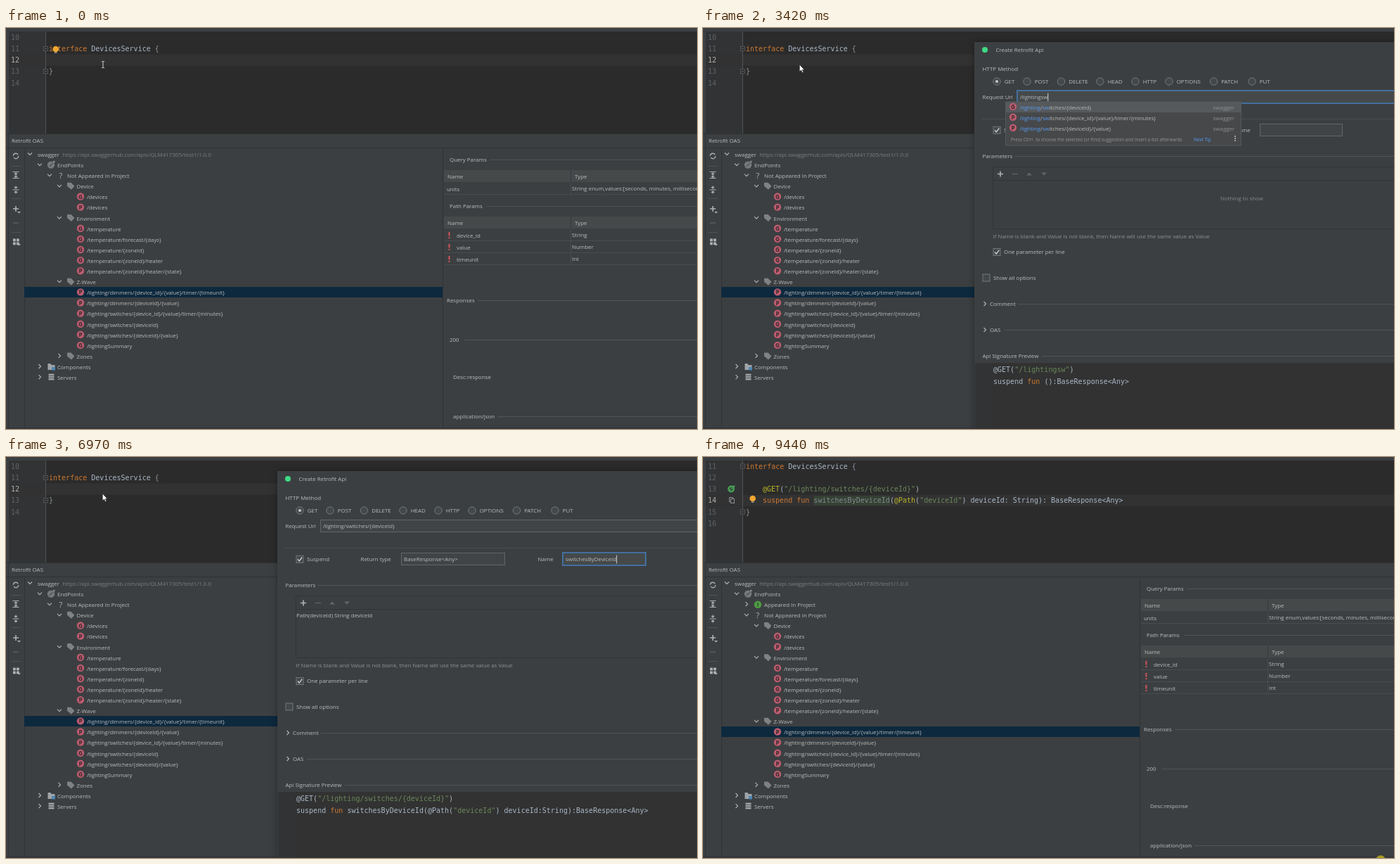
Recreate the animation shown at these times as an HTML page. Size 983x570 px, loop 9.5 s.

```html
<!DOCTYPE html>
<html lang="en">
<head>
<meta charset="utf-8">
<title>API dialog</title>
<style>
html, body { margin: 0; width: 100%; height: 100%; overflow: hidden; background: #3c3f41; }
svg { display: block; width: 983px; height: 570px; }
text { font: 7.95px "Open Sans", "Noto Sans", sans-serif; fill: #bbb; white-space: pre; }
.mono { font: 10.03px "DejaVu Sans Mono", "Noto Sans Mono", monospace; }
.path { font-size: 7.78px; }
.hint { font-size: 6.4px; }
.mark { font-size: 11px; }
.verb { font-size: 8.2px; font-weight: 700; text-anchor: middle; fill: #38292d; }
.frame { filter: drop-shadow(0 0 5px rgba(0, 0, 0, .35)); }
</style>
</head>
<body>
<svg id="stage" viewBox="0 0 983 570"></svg>
<script>
const LOOP = 9500;
const C = {
  panel: '#3c3f41', editor: '#2b2b2b', gutter: '#313335', row: '#323232', rule: '#515456',
  text: '#bbbbbb', dim: '#7c7e80', code: '#a9b7c6', brace: '#8d959e', key: '#cc7832', str: '#6a8759', ann: '#bbb529',
  faded: '#858a8e', pink: '#bc5c70', icon: '#afb1b3', blue: '#589df6', focus: '#436f9f'
};

// Drawing helpers; text y is the visual centre of the line
const esc = s => s.replace(/&/g, '&amp;').replace(/</g, '&lt;');
const rect = (x, y, w, h, fill, more = '') => `<rect x="${x}" y="${y}" width="${w}" height="${h}" fill="${fill}" ${more}/>`;
const box = (x, y, w, h, fill, stroke, sw = 1, more = '') => rect(x, y, w, h, fill, `stroke="${stroke}" stroke-width="${sw}" ${more}`);
const circle = (x, y, r, fill, more = '') => `<circle cx="${x}" cy="${y}" r="${r}" fill="${fill}" ${more}/>`;
const line = (d, stroke = C.icon, sw = 1.2) => `<path d="${d}" fill="none" stroke="${stroke}" stroke-width="${sw}"/>`;
const label = (x, y, s, fill = C.text, more = '') => `<text x="${x}" y="${y + 2.9}" style="fill:${fill}" ${more}>${esc(s)}</text>`;
const spans = parts => parts.map(([fill, s]) => `<tspan style="fill:${fill}">${esc(s)}</tspan>`).join('');
const code = (x, y, parts, more = '') => `<text class="mono" x="${x}" y="${y + 3.6}" ${more}>${spans(parts)}</text>`;
const group = (id, ...body) => `<g id="${id}">${body.join('')}</g>`;
const titled = (x, y, s, from) => label(x, y, s) + line(`M${from} ${Math.floor(y) + .5}H1010`, C.rule, 1);
const chevron = (x, y, open) => line(open ? `M${x - 3} ${y - 2.5}l3 3l3-3` : `M${x - 1.5} ${y - 3}l3 3l-3 3`);

const bulb = (x, y) => circle(x, y, 4.3, '#f0a732') + rect(x - 1.8, y + 4.4, 3.6, 1.5, '#9a9a9a');
const verb = (x, y, letter) => circle(x, y, 5.2, C.pink) + `<text class="verb" x="${x}" y="${y + 3}">${letter}</text>`;
const tag = (x, y) => `<path d="M${x - 5} ${y - 5}h5.5l5 5l-4.5 5l-6-5z" fill="#7f8183"/>`;
const fold = y => box(53.5, y - 3, 6, 6, C.editor, '#606366', .8) + line(`M55 ${y}h3`, '#7a7d80', .8);

const lineY = k => 13 + 16.25 * k;
function editor(first, count, current, open, close) {
  let out = rect(0, 5, 983, 145, C.editor) + rect(4, 5, 52, 145, C.gutter) + rect(0, 5, 4, 145, C.panel) +
    rect(4, lineY(current) - 8, 979, 16.2, C.row) + line('M56.5 5V150', '#55585a', .9);
  for (let k = 0; k < count; k++)
    out += code(7, lineY(k), [[k === current ? '#b0b0b0' : '#606366', String(first + k)]]);
  return out + fold(lineY(open)) + fold(lineY(close)) +
    code(61, lineY(open), [[C.key, 'interface '], [C.code, 'DevicesService '], [C.brace, '{']]) + code(61, lineY(close), [[C.brace, '}']]);
}

const paths = {
  device: ['G/devices', 'P/devices'],
  environment: ['G/temperature', 'G/temperature/forecast/{days}', 'G/temperature/{zoneId}', 'G/temperature/{zoneId}/heater', 'P/temperature/{zoneId}/heater/{state}'],
  zwave: ['P/lighting/dimmers/{device_id}/{value}/timer/{timeunit}', 'P/lighting/dimmers/{deviceId}/{value}',
    'P/lighting/switches/{device_id}/{value}/timer/{minutes}', 'G/lighting/switches/{deviceId}', 'P/lighting/switches/{deviceId}/{value}', 'G/lightingSummary']
};
const leaves = list => list.map(s => ['leaf', s]);

function tree(used) {
  const rows = [['root', 'swagger'], ['ends', 'EndPoints'], ...(used ? [['used', 'Appeared In Project']] : []),
    ['unused', 'Not Appeared In Project'], ['tag', 'Device'], ...leaves(paths.device),
    ['tag', 'Environment'], ...leaves(paths.environment), ['tag', 'Z-Wave'],
    ...leaves(used ? paths.zwave.filter(s => s !== 'G/lighting/switches/{deviceId}') : paths.zwave),
    ['tag', 'Zones'], ['parts', 'Components'], ['servers', 'Servers']];
  const draw = {
    root: (y, s) => chevron(34, y, 1) + label(45, y, s) + label(80.5, y, 'https://api.swaggerhub.com/apis/QLM417305/test1/1.0.0', C.dim),
    ends: (y, s) => chevron(48, y, 1) + circle(64, y - .5, 5.2, '#77797b') + line(`M61.5 ${y + 1.5}l5-4`, '#45484a') + circle(68.3, y - 5, 1.5, '#85878a') + label(73, y, s),
    used: (y, s) => chevron(62, y - 1) + circle(78, y - .5, 5.2, '#4f9a45') + line(`M78 ${y - 3}v5`, '#263b24') + label(87, y, s),
    unused: (y, s) => chevron(62, y, 1) + label(75.6, y + .5, '?', C.icon, 'class="mark"') + label(87, y, s),
    tag: (y, s) => chevron(76, y - (s === 'Zones'), s !== 'Zones') + tag(92, y - .5) + label(100.5, y, s),
    leaf: (y, s) => (s.includes('timeunit') ? rect(26, Math.round(y - 8), 595, 15, '#0d293e') : '') + verb(106, y - .9, s[0]) + label(115, y, s.slice(1), C.text, 'class="path"'),
    parts: (y, s) => chevron(48, y - 1) + `<path d="M59.5 ${y - 5}h4l1 2h5v7h-10z" fill="#9fa4a8"/>` + rect(65, y, 5, 4.5, '#4b86b4') + label(73, y, s),
    servers: (y, s) => chevron(48, y - 1) + [-5.5, -2.3, .9].map(d => rect(60.5, y + d, 8, 2.4, '#9fa4a8')).join('') + label(73, y, s)
  };
  return rows.map(([kind, s], k) => draw[kind](180 + 15.1 * k, s)).join('');
}

function toolWindow() {
  const tools = circle(14, 182, 3.7, 'none', `stroke="${C.icon}" stroke-width="1.4" stroke-dasharray="9 2.6"`) +
    line('M9.5 204.5h9M9.5 213.5h9M14 206v6M12 208l2-2l2 2M12 210.5l2 2l2-2') +
    line('M9.5 230h9M14 224.5v3M12 226l2 2l2-2M14 235.5v-3M12 234l2-2l2 2') +
    line('M10 257h8M14 253v8', C.icon, 1.6) + `<path d="M16 261h5l-2.5 2.5z" fill="${C.icon}"/>` +
    line('M10 277h8', '#626567') +
    [[10, 299.5], [15, 299.5], [10, 304.5], [15, 304.5]].map(([a, b]) => rect(a, b, 3.8, 3.8, C.icon)).join('') +
    `<path d="M16 307h5l-2.5 2.5z" fill="${C.icon}"/>` + line('M8 196.5h13M8 242.5h13M8 290.5h13', C.rule, 1);
  return rect(0, 150, 983, 420, C.panel) + line('M0 150.5H983M0 170.5H983M26.5 171V570M621.5 171V570M0 568.5H983M3.5 150V570', '#303234', 1) +
    label(8, 160, 'Retrofit OAS') + tools;
}

function details() {
  const head = y => rect(623, y - 9, 360, 17, '#45494a') + label(628, y, 'Name') + label(809, y, 'Type') + line(`M803.5 ${y - 9}v17`, '#35383a', 1);
  const row = (y, name, type, must) => (must ? line(`M630.5 ${y - 5}v5.5M630.5 ${y + 2}v2`, '#d2555a', 2) : '') +
    label(must ? 641 : 627, y, name) + label(805, y - .5, type) + line(`M623 ${y + 7.5}H983M803.5 ${y - 9}v17`, '#4c5052', .8);
  return titled(631, 187, 'Query Params', 689) + head(211) + row(229, 'units', 'String enum,values:[seconds, minutes, milliseconds]') +
    titled(631, 253, 'Path Params', 684) + head(277) + row(295, 'device_id', 'String', 1) + row(312, 'value', 'Number', 1) + row(329, 'timeunit', 'Int', 1) +
    titled(627, 387.5, 'Responses', 671) + titled(631, 443.5, '200', 652) + label(636, 496, 'Desc:response') + titled(636, 552.5, 'application/json', 699);
}

const field = (id, x, y, w) => box(x + .5, y + .5, w, 17, '#404446', '#646768') +
  group(id, box(x, y, w + 1, 18, '#45494a', C.focus, 2));
const check = (x, y, on) => box(x - 5, y - 5, 10, 10, '#43494a', '#747779') + (on ? line(`M${x - 3} ${y}l2.2 2.6l4-5.4`, '#d0d0d0', 1.4) : '');

function dialog() {
  const methods = [['GET', 418], ['POST', 461], ['DELETE', 509.5], ['HEAD', 565], ['HTTP', 615], ['OPTIONS', 663], ['PATCH', 726.5], ['PUT', 781]];
  const radios = methods.map(([s, x], k) => circle(x, 76, 5.2, '#43494a', 'stroke="#747779"') + (k ? '' : circle(x, 76, 2.1, '#c4c4c4')) + label(x + 10.7, 76.5, s)).join('');
  return rect(386, 20, 641, 560, C.panel, 'class="frame"') + circle(401, 31, 4, '#3ddc84') + label(416.5, 31, 'Create Retrofit Api') +
    label(397.5, 58, 'HTTP Method') + radios + label(397.5, 98.5, 'Request Url') + field('urlFocus', 447, 89, 564) + label(451, 98.5, '', C.text, 'id="url" class="path"') +
    line('M397 129.5H1010', '#4a4d4f', 1) +
    check(418, 145.3, 1) + group('suspendFocus', box(412.5, 140, 11, 11, 'none', C.focus, 2, 'rx="1.5"')) + label(428, 145.5, 'Suspend') +
    label(504.5, 145.5, 'Return type') + field('typeFocus', 562, 136, 147) + label(566, 145.5, 'BaseResponse<Any>') +
    label(756.5, 145.5, 'Name') + field('nameFocus', 792, 136, 117) + label(796, 145.5, '', C.text, 'id="name"') +
    rect(0, 92.5, 1, 12, '#d0d0d0', 'id="fieldCaret"') +
    titled(397.5, 182.5, 'Parameters', 443) + box(412.5, 197.5, 598, 88, 'none', '#323537') + line('M412 216.5H1010', '#323537', 1) +
    line('M419 207.5h8M423 203.5v8', C.icon, 1.6) + line('M440 207.5h8', '#626567') +
    '<path d="M460 209.5l4-4l4 4zM481 205.5l4 4l4-4z" fill="#626567"/>' +
    group('noParams', label(736, 242.5, 'Nothing to show', '#85888a')) + group('params', label(413, 225, 'Path(deviceId) String deviceId')) +
    label(412.5, 296.5, 'If Name is blank and Value is not blank, then Name will use the same value as Value', '#8f9193') +
    check(418, 318.5, 1) + label(428, 318.5, 'One parameter per line') + check(403, 355, 0) + label(413, 355.5, 'Show all options') +
    chevron(401, 392) + titled(408, 392, 'Comment', 448) + chevron(401, 429) + titled(408, 429, 'OAS', 428) + titled(397.5, 466, 'Api Signature Preview', 482) +
    rect(397, 476, 614, 104, C.row) + rect(387, 476, 25, 104, C.gutter) + code(413, 485.5, [], 'id="sig1"') + code(413, 502, [], 'id="sig2"');
}

function completion() {
  const items = ['G/{deviceId}', 'P/{device_id}/{value}/timer/{minutes}', 'P/{deviceId}/{value}'];
  const rows = items.map((s, k) => {
    const y = 112.8 + 15 * k;
    const match = spans([[C.blue, '/lighting'], [C.text, '/'], [C.blue, 'sw'], [C.text, 'itches' + s.slice(1)]]);
    return verb(441, y - 1, s[0]) + `<text class="path" x="450.5" y="${y + 2.9}">${match}</text>` + label(725.5, y, 'swagger', '#8c8f91');
  });
  return box(430.5, 105, 335, 62, '#46484a', '#55585a') + rect(431, 105, 334, 15, '#56595b') + rows.join('') +
    label(438, 157.7, 'Press Ctrl+. to choose the selected (or first) suggestion and insert a dot afterwards', '#939597', 'class="hint"') +
    label(698, 157.7, 'Next Tip', C.blue, 'class="hint"') + [154, 157, 160].map(y => circle(757, y, .9, '#c8c8c8')).join('');
}

function generateMenu() {
  const items = ['Override Methods...', 'Create Retrofit Api', 'Implement Methods...', 'toString()', 'Test...', 'Copyright'];
  return box(61.5, 53.5, 179, 118, C.panel, '#55585a') + rect(62, 54, 178, 20, '#45484a') + label(134, 64, 'Generate') +
    rect(62, 74.5, 178, 15, '#4b6eaf', 'id="menuPick"') + items.map((s, k) => label(72, 82 + 15.3 * k, s)).join('') + label(212, 82, 'Ctrl+O', '#999');
}

const inserted = (ann, str, key, plain) =>
  code(85, lineY(2), [[ann, '@GET'], [plain, '('], [str, '"/lighting/switches/{deviceId}"'], [plain, ')']]) +
  code(85, lineY(3), [[key, 'suspend fun '], [C.faded, 'switchesByDeviceId'], [plain, '('], [ann, '@Path'], [plain, '('], [str, '"deviceId"'], [plain, ') deviceId: String): BaseResponse<Any>']]);

document.getElementById('stage').innerHTML =
  rect(0, 0, 983, 570, C.panel) + toolWindow() + details() +
  group('before', editor(10, 5, 2, 1, 3), tree(false)) +
  group('after', editor(11, 6, 3, 0, 4), rect(157.5, 55, 108.5, 14, '#344134'),
    group('plain', inserted(C.faded, C.faded, C.faded, C.faded)), group('coloured', inserted(C.ann, C.str, C.key, C.code)),
    group('marks', circle(40, 45.5, 3.6, C.gutter, 'stroke="#499c54" stroke-width="2.6"') + circle(44, 41.7, 1.5, '#499c54') + line('M38 47l4-3', '#499c54') +
      box(37.5, 57.5, 5, 6, C.gutter, '#888b8d') + box(39.5, 59.5, 5, 6, C.gutter, '#888b8d')), tree(true)) +
  group('bulbBefore', bulb(70.7, 30)) + group('bulbAfter', bulb(70.7, 59)) +
  rect(61, 38.5, 1.2, 14, C.text, 'id="caretBefore"') + rect(157.3, 55, 1.4, 14, '#d0d0d0', 'id="caretAfter"') +
  group('menu', generateMenu()) + group('dialog', dialog()) + group('completion', completion()) +
  group('beam', line('M-2 -4.5h1.5l.5 .5l.5-.5h1.5M0 -4v8M-2 4.5h1.5l.5-.5l.5 .5h1.5', '#d0d0d0', 1)) +
  group('arrow', '<path d="M0 0v10l2.3-2l1.7 3.6l1.6-.8l-1.7-3.4h3z" fill="#fff" stroke="#222" stroke-width=".6"/>') +
  group('halo', circle(964, 573.5, 7.2, '#a89c20'));

const el = id => document.getElementById(id);
const show = (id, on) => { el(id).style.display = on ? '' : 'none'; };
const within = (t, a, b) => t >= a && t < b;
const stepAt = (steps, t) => steps.reduce((v, [at, next]) => t >= at ? next : v, steps[0][1]);

const openness = [[0, 0], [2420, .2], [2490, .5], [2560, .75], [2620, .92], [2690, 1], [7360, .75], [7440, .38], [7500, 0]];
const urlSteps = [[0, ''], [3160, '/li'], [3220, '/light'], [3290, '/lighting'], [3420, '/lightingsw'], [3960, '/lighting/switches/{deviceId}']];
const nameSteps = [[0, ''], [6500, 'swi'], [6600, 'switche'], [6690, 'switchesBy'], [6790, 'switchesByDev'], [6880, 'switchesByDevice'], [6970, 'switchesByDeviceId']];

let signature;
function fillForm(t) {
  const url = stepAt(urlSteps, t), name = stepAt(nameSteps, t), bound = t >= 4100;
  const next = url + '|' + name + bound;
  if (next !== signature) {
    signature = next;
    el('url').textContent = url;
    el('name').textContent = name;
    el('sig1').innerHTML = spans([[C.code, '@GET('], [C.str, `"${url}"`], [C.code, ')']]);
    const arg = bound ? [[C.code, '@Path('], [C.str, '"deviceId"'], [C.code, ') deviceId:String']] : [];
    el('sig2').innerHTML = spans([[C.code, 'suspend '], [C.key, 'fun '], [C.code, name + '('], ...arg, [C.code, '):BaseResponse<Any>']]);
  }
  show('params', bound);
  show('noParams', !bound);
  show('urlFocus', t < 4700);
  show('suspendFocus', within(t, 4700, 4900));
  show('typeFocus', within(t, 4900, 5100));
  show('nameFocus', t >= 5100);
  show('fieldCaret', within(t, 2760, 4700) || within(t, 5100, 5630) || t >= 6100);
  const inName = t >= 5100;
  el('fieldCaret').setAttribute('x', inName ? 796 + el('name').getComputedTextLength() : 451 + el('url').getComputedTextLength());
  el('fieldCaret').setAttribute('y', inName ? 139.5 : 92.5);
}

function movePointer(t) {
  const p = Math.min(1, Math.max(0, (t - 8220) / 820)), e = p * p * (3 - 2 * p);
  const x = 138 + 718 * e, y = 52 + 522 * e;
  const arrow = within(t, 2420, 7360) || y > 150;
  show('arrow', arrow);
  show('beam', !arrow);
  el('arrow').setAttribute('transform', `translate(${x - .7} ${y})`);
  el('beam').setAttribute('transform', `translate(${x} ${y})`);
}

function render(t) {
  const done = t >= 7360, p = stepAt(openness, t);
  show('before', !done);
  show('after', done);
  show('plain', t < 7690);
  show('coloured', t >= 7690);
  show('marks', t >= 7760);
  show('bulbBefore', t < 440);
  show('bulbAfter', t >= 8280);
  show('caretBefore', within(t, 310, 840));
  show('caretAfter', within(t, 7360, 8430) || within(t, 8940, 9440));
  show('menu', within(t, 970, 1890));
  el('menuPick').setAttribute('y', t < 1630 ? 74.5 : 89.8);
  show('dialog', p > 0);
  if (p > 0) {
    fillForm(t);
    el('dialog').setAttribute('opacity', p);
    el('dialog').setAttribute('transform', `translate(707 300) scale(${.92 + .08 * p}) translate(-707 -300)`);
  }
  show('completion', within(t, 3420, 3960));
  movePointer(t);
  show('halo', t >= 9440);
}

const start = performance.now();
function tick() {
  render((performance.now() - start) % LOOP);
  requestAnimationFrame(tick);
}
render(0);
requestAnimationFrame(tick);
</script>
</body>
</html>
```
